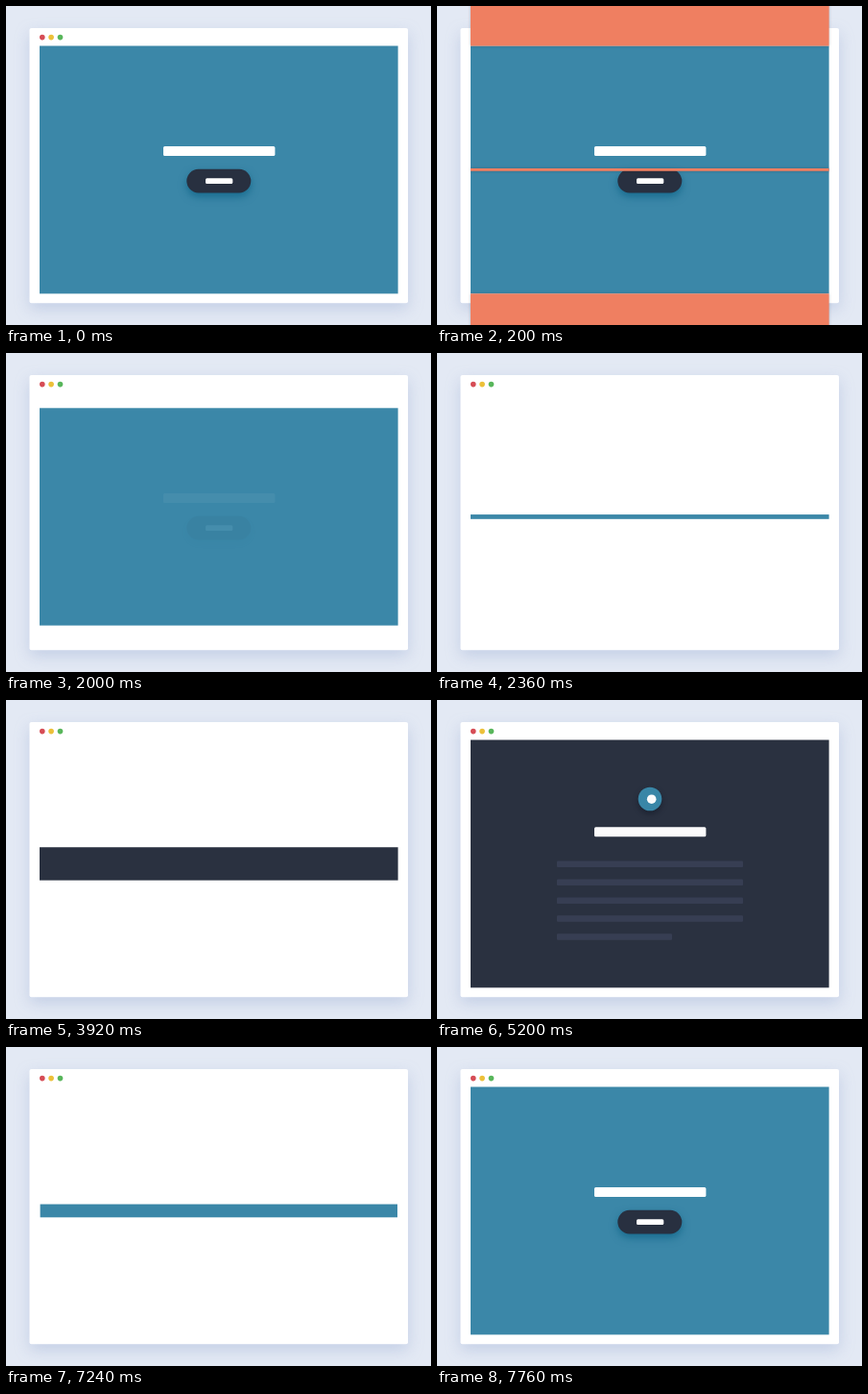
An HTML page for the animation above (9 s loop, 443x332 px).

```html
<!DOCTYPE html>
<html lang="en">
<head>
<meta charset="utf-8">
<title>Panel transition</title>
<style>
  html, body { margin: 0; width: 100%; height: 100%; overflow: hidden; background: #e3e9f4; }
  svg { display: block; width: 100vw; height: 100vh; }
  .window { fill: #fff; filter: drop-shadow(0 6px 8px rgba(105, 130, 190, .26)); }
  .bar { fill: #fff; }
  .button { fill: #283040; filter: drop-shadow(0 4px 4px rgba(0, 88, 125, .6)); }
  .badge { fill: #3a88a9; filter: drop-shadow(0 3px 3px rgba(14, 20, 34, .55)); }
  .text { fill: #383f54; }
  #guides { fill: #ef7f61; filter: drop-shadow(0 0 1.5px rgba(60, 30, 30, .3)); }
</style>
</head>
<body>
<svg viewBox="0 0 443 332">
  <rect class="window" x="24.5" y="23" width="394.5" height="286.3" rx="2"/>
  <circle cx="37.8" cy="32.6" r="2.8" fill="#d64c55"/>
  <circle cx="47.1" cy="32.6" r="2.8" fill="#ecc039"/>
  <circle cx="56.5" cy="32.6" r="2.8" fill="#58b65b"/>

  <clipPath id="clip"><rect class="panel"/></clipPath>
  <rect class="panel" id="fill"/>
  <g clip-path="url(#clip)">
    <g id="home">
      <rect class="bar" x="164" y="146" width="116.4" height="10" rx="1.5"/>
      <rect class="button" x="188.3" y="169.8" width="67" height="24.6" rx="12.3"/>
      <rect class="bar" x="208" y="179.3" width="28.3" height="5.8" rx="1.5"/>
    </g>
    <g id="article">
      <circle class="badge" cx="222" cy="103" r="12.3"/>
      <circle class="bar" cx="223.7" cy="103.2" r="4.8"/>
      <rect class="bar" x="164" y="132.2" width="116.4" height="10" rx="1.5"/>
      <g id="lines"></g>
    </g>
  </g>

  <g id="guides">
    <rect x="35" y="-10" width="373.6" height="51.5"/>
    <rect x="35" y="169" width="373.6" height="2.8"/>
    <rect x="35" y="299.4" width="373.6" height="50"/>
  </g>
</svg>
<script>
  const LOOP = 9000;
  const FULL = { w: 373.6, h: 257.9 }, THIN = 2.8;
  const MID = { x: 221.8, y: 170.45 };
  const BLUE = '#3b87a8', DARK = '#2a3140';

  const $ = id => document.getElementById(id);
  const fill = $('fill'), home = $('home'), article = $('article'), guides = $('guides');
  const panels = document.querySelectorAll('.panel');

  for (let i = 0; i < 5; i++) {
    $('lines').insertAdjacentHTML('beforeend',
      `<rect class="text" x="125" y="${167.6 + i * 18.9}" width="${i < 4 ? 194 : 120}" height="6.5" rx="1"/>`);
  }

  const easeInOut = power => p =>
    p < .5 ? 2 ** (power - 1) * p ** power : 1 - 2 ** (power - 1) * (1 - p) ** power;
  const quad = easeInOut(2), cubic = easeInOut(3);
  const ramp = (t, from, to, ease = quad) => ease(Math.min(1, Math.max(0, (t - from) / (to - from))));

  // Times are relative to the start of one collapse and reopen.
  const SWAP = 1370, PERIOD = 3380;
  function pose(t) {
    return {
      h: 1 - ramp(t, 0, 640, cubic) + ramp(t, 1920, 2560, cubic),
      w: 1 - ramp(t, 630, SWAP) + ramp(t, SWAP, 2090),
      before: 1 - ramp(t, 0, 240),
      after: ramp(t, 2250, 2560),
      swapped: t >= SWAP
    };
  }

  function draw(t) {
    const back = t >= 1800 + PERIOD;
    const p = pose(t - 1800 - (back ? PERIOD : 0));
    const w = FULL.w * p.w, h = THIN + (FULL.h - THIN) * p.h;
    for (const el of panels) {
      el.setAttribute('x', MID.x - w / 2);
      el.setAttribute('y', MID.y - h / 2);
      el.setAttribute('width', w);
      el.setAttribute('height', h);
    }
    fill.setAttribute('fill', p.swapped !== back ? DARK : BLUE);
    home.style.opacity = back ? p.after : p.before;
    article.style.opacity = back ? p.before : p.after;
    guides.style.opacity = ramp(t, 0, 200) - ramp(t, 1400, 1600);
  }

  const start = performance.now();
  function tick(now) {
    draw(Math.max(0, now - start) % LOOP);
    requestAnimationFrame(tick);
  }
  draw(0);
  requestAnimationFrame(tick);
</script>
</body>
</html>
```
